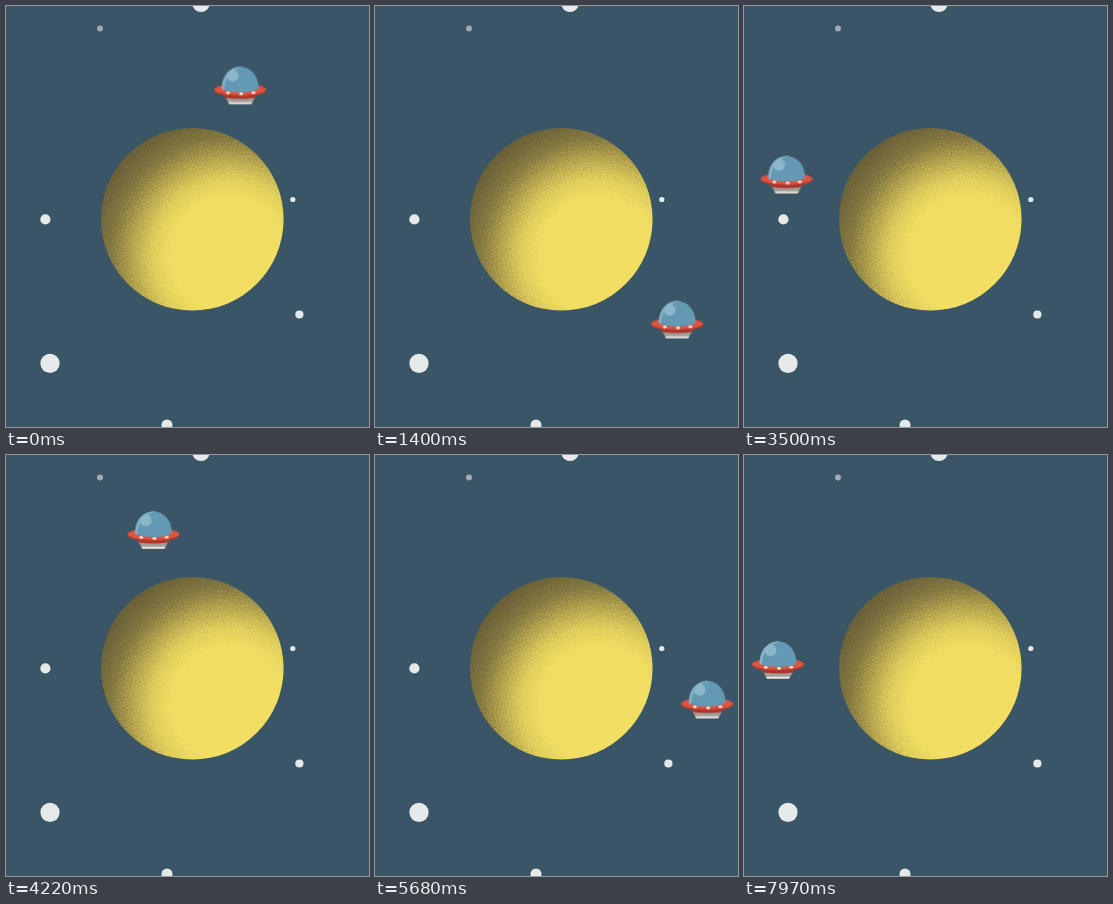
Recreate the animation shown at these times as an HTML page without scripts. Size 363x421 px, loop 7.99 s.

```html
<!DOCTYPE html>
<html lang="en">
<head>
<meta charset="utf-8">
<title>Saucer orbiting a planet</title>
<style>
  html, body { margin: 0; width: 100%; height: 100%; overflow: hidden; background: #3a5666; }
  svg { display: block; width: 363px; height: 421px; }
  .saucer { transform-origin: 0 0; animation: orbit 7.99s linear infinite; }
  /* turn around the orbit centre while staying upright */
  @keyframes orbit {
    from { transform: translate(183.6px, 221px) rotate(19.6deg) translateY(-150.4px) rotate(-19.6deg); }
    to { transform: translate(183.6px, 221px) rotate(637.6deg) translateY(-150.4px) rotate(-637.6deg); }
  }
</style>
</head>
<body>
<svg viewBox="0 0 363 421">
  <defs>
    <radialGradient id="shade" gradientUnits="userSpaceOnUse" cx="224" cy="250" r="140">
      <stop offset=".42" stop-color="#f1de62"/>
      <stop offset=".56" stop-color="#dfcd5c"/>
      <stop offset=".7" stop-color="#b5a54e"/>
      <stop offset=".84" stop-color="#857941"/>
      <stop offset="1" stop-color="#6b6138"/>
    </radialGradient>
    <filter id="grain" x="0" y="0" width="1" height="1" color-interpolation-filters="sRGB">
      <feTurbulence type="fractalNoise" baseFrequency=".8" numOctaves="2" seed="4"/>
      <feDisplacementMap in="SourceGraphic" scale="30" xChannelSelector="R" yChannelSelector="G"/>
    </filter>
    <clipPath id="disc"><circle cx="186.3" cy="213.3" r="91.3"/></clipPath>
    <clipPath id="dome"><path id="glass" d="M-18.4 3.5C-18.4-10-10.5-18.6 0-18.6S18.4-10 18.4 3.5C12 8-12 8-18.4 3.5Z"/></clipPath>
    <clipPath id="rim"><ellipse id="plate" cy="4.6" rx="26" ry="6.6"/></clipPath>
  </defs>

  <rect width="363" height="421" fill="#3a5666"/>

  <g fill="#e6e9e9">
    <circle cx="195" cy="-2.8" r="8.8"/>
    <circle cx="94" cy="22.4" r="3" fill="#a3a9ae"/>
    <circle cx="286.8" cy="193.5" r="2.6"/>
    <circle cx="39.4" cy="213.4" r="5.1"/>
    <circle cx="293.4" cy="308.5" r="4.1"/>
    <circle cx="44" cy="357.4" r="9.6"/>
    <circle cx="161" cy="419" r="5.5"/>
  </g>

  <g clip-path="url(#disc)">
    <rect x="70" y="97" width="233" height="233" fill="url(#shade)" filter="url(#grain)"/>
  </g>

  <g class="saucer">
    <path d="M-16 10H16L11 18.6H-11Z" fill="#a39d99"/>
    <path d="M-12.2 16.8H12.2L11 18.8H-11Z" fill="#e9e5df"/>
    <path d="M-18 8H18L14.5 12.6Q0 14.6-14.5 12.6Z" fill="#a9362c"/>
    <use href="#plate" fill="#b83b30"/>
    <g clip-path="url(#rim)"><ellipse cy="3" rx="27" ry="6.6" fill="#e0533f"/></g>
    <use href="#glass" fill="#6399b3"/>
    <g clip-path="url(#dome)">
      <path d="M-19 5C-19-11-10-19 0-19H5C-8-17-16-9-16 6Z" fill="#86b2c6"/>
      <circle cx="-7.4" cy="-9.6" r="5.8" fill="#8bb7cb"/>
    </g>
    <g fill="#f6e9df">
      <ellipse cx="-12.3" cy="7.4" rx="1.9" ry="1.3"/>
      <ellipse cx="1" cy="8.4" rx="1.9" ry="1.3"/>
      <ellipse cx="13.2" cy="7.2" rx="1.9" ry="1.3"/>
    </g>
  </g>
</svg>
</body>
</html>
```
